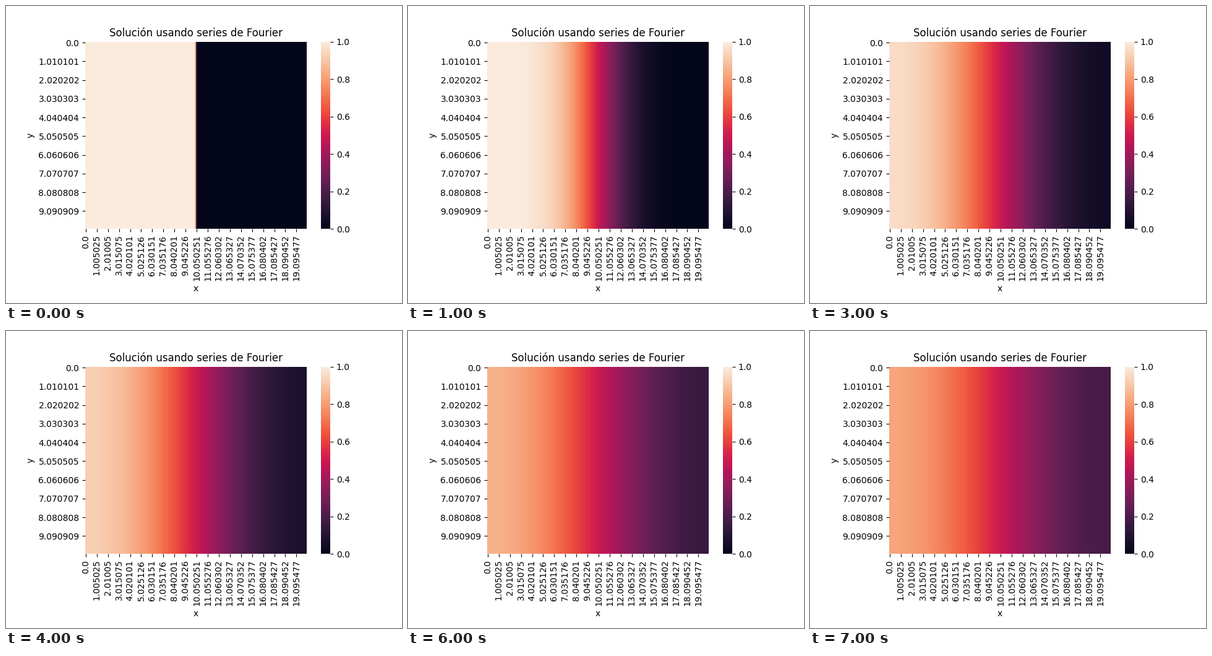
Recreate the animation shown at these times as a matplotlib script. Size 640 by 480 pixels, loop 8 s.

```python
import numpy as np
import matplotlib.pyplot as plt
from matplotlib.animation import FuncAnimation
from matplotlib.colors import LinearSegmentedColormap

LENGTH, HEIGHT = 20, 10
NX, NY = 200, 100
FRAMES, INTERVAL = 8, 1000
DIFFUSIVITY = 4.0
T_START = 2.7e-4   # tiny offset smooths the initial step

# Colour stops of the "rocket" map: every 1/11, every 1/7, and the middle
ELEVENTHS = ["#03051a", "#221331", "#451c47", "#6a1f56", "#921c5b", "#b91657",
             "#d92847", "#ed513e", "#f47c56", "#f6a47b", "#f7c9aa", "#faebdd"]
SEVENTHS = ["#35193e", "#701f57", "#ad1759", "#e13342", "#f37651", "#f6b48f"]
stops = [(i / 11, c) for i, c in enumerate(ELEVENTHS)]
stops += [((i + 1) / 7, c) for i, c in enumerate(SEVENTHS)]
stops.append((0.5, "#cb1b4f"))
rocket = LinearSegmentedColormap.from_list("rocket", sorted(stops), N=256)

x = np.linspace(0, LENGTH, NX)
y = np.linspace(0, HEIGHT, NY)
n = np.arange(1, 1600, 2)
k = n * np.pi / LENGTH
coef = 2 / (n * np.pi) * (-1.0) ** (n // 2)
modes = np.cos(np.outer(x, k))


def heat(t):
    """Insulated bar, left half hot: cosine series at time t."""
    u = 0.5 + modes @ (coef * np.exp(-DIFFUSIVITY * k**2 * t))
    return np.tile(np.clip(u, 0, 1), (NY, 1))


def labels(values):
    return [str(round(float(v), 6)) for v in values]


plt.rcParams["font.family"] = "DejaVu Sans"
fig, ax = plt.subplots(figsize=(6.4, 4.8), dpi=100)
fig.subplots_adjust(left=0.2, right=0.9, bottom=0.25, top=0.88)

mesh = ax.pcolormesh(heat(T_START), cmap=rocket, vmin=0, vmax=1)
ax.set(xlim=(0, NX), ylim=(NY, 0), xlabel="x", ylabel="y",
       title="Solución usando series de Fourier")
ax.set_xticks(np.arange(0, NX, 10) + 0.5, labels(x[::10]), rotation=90)
ax.set_yticks(np.arange(0, NY, 10) + 0.5, labels(y[::10]))
ax.spines[:].set_visible(False)

bar = fig.colorbar(mesh, ax=ax)
bar.outline.set_linewidth(0)


def update(i):
    mesh.set_array(heat(i + T_START))
    return (mesh,)


anim = FuncAnimation(fig, update, frames=FRAMES, interval=INTERVAL,
                     repeat=True, repeat_delay=0)
plt.show()
```
